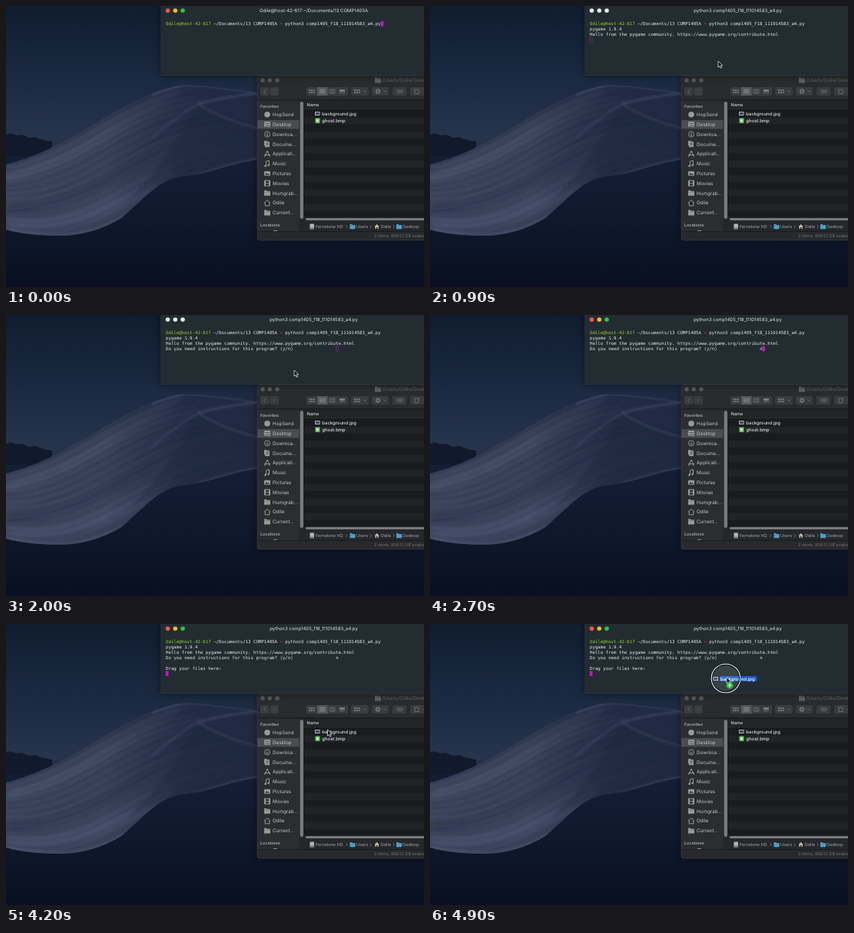
These frames come from a looping animation (544x367 px, 5 s). An HTML page:

```html
<!DOCTYPE html>
<html lang="en">
<head>
<meta charset="utf-8">
<title>Terminal and file window</title>
<style>
html, body { margin: 0; width: 100%; height: 100%; overflow: hidden; background: #0a1122; }
svg { display: block; width: 544px; height: 367px; }
text { font-family: Inter, Roboto, sans-serif; text-rendering: geometricPrecision; white-space: pre; }
.mono text { font: 5.742px "DejaVu Sans Mono", "Liberation Mono", monospace; fill: #e4e8e8; }
</style>
</head>
<body>
<svg id="stage" viewBox="0 0 544 367" xmlns="http://www.w3.org/2000/svg"></svg>
<script>
const LOOP = 5000, STEP = 100;
const USER = 'Odile', HOST = 'host-42-617';
const SCRIPT = 'python3 comp1405_f18_111014583_a4.py';
const FOLDER = '~/Documents/13 COMP1405A';
const COL = 3.457, LINE = 6.95, LEFT = 208, BASE = 25.1;

let seed = 7;
const rnd = () => (seed = seed * 16807 % 2147483647) / 2147483647;

const rect = (x, y, w, h, fill, r = 0, more = '') =>
  `<rect x="${x}" y="${y}" width="${w}" height="${h}" rx="${r}" fill="${fill}" ${more}/>`;
const dot = (x, y, r, fill, more = '') => `<circle cx="${x}" cy="${y}" r="${r}" fill="${fill}" ${more}/>`;
const path = (d, fill, more = '') => `<path d="${d}" fill="${fill}" ${more}/>`;
const line = (d, color, width = .8, more = '') =>
  path(d, 'none', `stroke="${color}" stroke-width="${width}" ${more}`);
const text = (x, y, s, size, fill, more = '') =>
  `<text x="${x}" y="${y}" font-size="${size}" fill="${fill}" ${more}>${s}</text>`;
const mono = (col, row, s, more = '') =>
  `<text x="${LEFT + col * COL}" y="${BASE + row * LINE}" ${more}>${s}</text>`;
const grad = (id, stops, dir = 'x2="0" y2="1"') => `<linearGradient id="${id}" ${dir}>` +
  stops.map(([at, c]) => `<stop offset="${at}" stop-color="${c}"/>`).join('') + '</linearGradient>';
const folder = (x, y, c, size = 8) => `<g transform="translate(${x} ${y}) scale(${size / 8})">` +
  path('M0 0h3l1 1h4v6h-8z', c) + line('M0 2.2h8', '#0005', .5) + '</g>';
const house = (x, y, c, size = 8) => `<g transform="translate(${x} ${y}) scale(${size / 8})">` +
  path('M0 4l4-4 4 4h-1v4h-2v-3h-2v3h-2v-4z', c) + '</g>';

function wallpaper() {
  const top = [0, 207, 90, 185, 150, 118, 235, 103];
  const low = [0, 292, 130, 320, 150, 225, 327, 200];
  let stars = '', streaks = '';
  for (let i = 0; i < 40; i++)
    stars += dot(rnd() * 326, rnd() * 130, .2 + rnd() * .3, '#a9bfdd', `opacity="${.15 + rnd() * .4}"`);
  for (let i = 0; i < 26; i++) {
    const k = (i + rnd()) / 26;
    const p = top.map((v, j) => v + (low[j] - v) * k);
    streaks += line(`M${p[0]} ${p[1]}C${p.slice(2)}`, i % 2 ? '#7a839c' : '#18213a',
      1.5 + rnd() * 3, `opacity="${.05 + rnd() * .13}"`);
  }
  return rect(0, 0, 544, 367, 'url(#sky)') + stars +
    path('M0 168l6-2 8 3 7-1 9 4 8-1 10 4 12 2V212H0z', '#111a2c') +
    rect(0, 196, 544, 171, 'url(#ground)') +
    '<g clip-path="url(#dune)">' + rect(0, 100, 330, 210, 'url(#sand)') +
    '<g filter="url(#soft)">' + streaks + '</g>' +
    `<g filter="url(#wide)">` +
    line('M0 222Q70 202 120 170T225 112', '#667089', 9, 'opacity=".3"') +
    line('M0 262Q80 252 140 216T250 150', '#151e36', 12, 'opacity=".3"') +
    line('M0 285Q70 292 130 264T215 215', '#69738e', 11, 'opacity=".36"') + '</g>' +
    rect(130, 100, 200, 210, 'url(#dusk)') +
    `<g filter="url(#soft)">` +
    path('M250 127L330 158V205L228 224Q180 236 160 252Q215 200 250 127z', '#18223a', 'opacity=".4"') +
    line('M250 128Q285 150 330 160', '#56617c', 2, 'opacity=".45"') +
    line('M250 128Q285 118 330 114', '#5c6782', 2.5, 'opacity=".45"') +
    line('M250 128Q225 142 190 172', '#5b6680', 2, 'opacity=".35"') +
    line('M190 116Q220 103 240 103T330 113', '#69748e', 2, 'opacity=".5"') +
    line('M0 292C60 302 100 304 150 277S220 222 327 200', '#737d95', 2, 'opacity=".35"') +
    '</g></g>';
}

function sidebar() {
  const names = ['HopSend', 'Desktop', 'Downloa...', 'Docume...', 'Applicati...', 'Music',
    'Pictures', 'Movies', 'Humgrab...', USER, 'Current...'];
  const c = '#97999b', x = 336;
  const icon = [
    y => dot(x + 4, y + 4, 3.8, c),
    y => rect(x, y + .5, 8, 7, c, 1) + line(`M${x + 1} ${y + 3}h6m-6 3h6`, '#3c3e40', .7),
    y => dot(x + 4, y + 4, 3.6, 'none', `stroke="${c}" stroke-width=".9"`) +
      line(`M${x + 4} ${y + 2}v4m-2-2l2 2 2-2`, c),
    y => path(`M${x} ${y}h4v1h3v7h-6v-2h-1z`, c) + line(`M${x + 2} ${y + 3}h4m-4 2h4`, '#303234', .6),
    y => line(`M${x + 4} ${y}l-3.5 8M${x + 4} ${y}l3.5 8M${x} ${y + 5.5}h8`, c, 1),
    y => line(`M${x + 2.5} ${y + 7}v-6l4-1v6`, c, 1) + dot(x + 1.6, y + 7, 1.3, c) + dot(x + 5.6, y + 6, 1.3, c),
    y => rect(x, y + 1, 8, 6, c, 1) + path(`M${x + 1} ${y + 6}l2-3 1.5 2 1-1 1.5 2z`, '#393b3d'),
    y => rect(x, y, 8, 8, c, .7) + rect(x + 2, y + 1, 4, 2.6, '#303234') + rect(x + 2, y + 4.4, 4, 2.6, '#303234'),
    y => folder(x, y + .5, c),
    y => line(`M${x} ${y + 4}l4-3.7 4 3.7m-6.8-.6v4.3h5.6v-4.3`, c, 1),
    y => folder(x, y + .5, c)
  ];
  return rect(327, 123, 61, 171, '#2b2d2f') + rect(327, 149, 55, 11.4, '#4a4c4f') +
    text(331, 133, 'Favorites', 5.4, '#a8aaac', 'font-weight="600"') +
    names.map((n, i) => {
      const y = 141.8 + i * 12.82;
      return icon[i](y - 4) + text(347, y + 2.3, n, 6.3, '#c3c5c7');
    }).join('') +
    text(331, 288, 'Locations', 5.4, '#a8aaac', 'font-weight="600"') +
    rect(348, 293, 5, 1, '#8c8e90') +
    rect(381.5, 123, 6.5, 171, '#242628') + rect(382.6, 125, 4.4, 153, '#77797b', 2.2);
}

const photoIcon = (x, y) => rect(x, y, 6.5, 5, '#d4d8dc', .4) + rect(x + .7, y + .7, 5.1, 3.6, '#3b4658');

function toolbar() {
  const g = '#77797b', button = (x, w) => rect(x, 106, w, 11, '#393b3d', 1.8);
  let s = rect(327, 91.5, 230, 31.5, '#292b2d', 3) + rect(327, 122.4, 217, .8, '#131517');
  for (const x of [334, 343.3, 353]) s += dot(x, 97, 2.8, '#55575a');
  s += folder(480, 93.5, '#5c5f62') + text(489.5, 99.2, `/Users/${USER}/Desktop`, 6.4, '#606366');
  s += button(331, 11.5) + button(343.5, 11.5) + button(391, 54) + button(449, 23) +
    button(476, 22) + button(503, 18) + button(526, 20) + rect(405, 106, 13.5, 11, '#57595b');
  s += line('M338 109l-2.5 2.5 2.5 2.5', g) + line('M348 109l2.5 2.5-2.5 2.5', '#56585a');
  for (let i = 0; i < 6; i++)
    s += rect(394.2 + i % 3 * 2.8, 109 + (i > 2) * 3, 2, 2, g) + rect(453 + i % 3 * 2.8, 109 + (i > 2) * 3, 2, 2, g);
  s += line('M408 109.5h7.5m-7.5 2h7.5m-7.5 2h7.5', '#929496', .8) +
    line('M421 109h7v5h-7zm2.4 0v5m2.4-5v5', g, .7) + rect(434, 109, 7, 3, g) +
    line('M434 113.5h7', g, 1.2, 'stroke-dasharray="1.4 .6"') +
    line('M465.5 110.7l1.5 1.5 1.5-1.5M491.5 110.7l1.5 1.5 1.5-1.5', g) +
    dot(484, 111.5, 2, 'none', `stroke="${g}" stroke-width="1.3"`) +
    dot(484, 111.5, 3.2, 'none', `stroke="${g}" stroke-width="1" stroke-dasharray="1.2 1.31"`) +
    rect(508.5, 109.7, 8, 3.6, 'none', 1.8, `stroke="${g}" stroke-width=".8"`) +
    line('M510.5 111.5h4', g) + line('M532 109h5v5.5h-5z', g);
  return s;
}

function fileWindow() {
  let rows = rect(388, 123, 156, 157, '#191b1d') + rect(388, 123, 156, 11, '#222426');
  for (let i = 0; i < 15; i++) if (i % 2) rows += rect(389, 135.8 + i * 9.42, 155, 9.42, '#212326');
  const crumbs = [[403, 'Fernstone HD'], [456, 'Users'], [487.5, USER], [516, 'Desktop']];
  return rect(327, 91.5, 225, 214.5, '#000', 3, 'opacity=".45" filter="url(#shadow)"') +
    rect(327, 91.5, 230, 214.5, '#292b2d', 3) + rows + sidebar() + toolbar() +
    text(391.5, 131, 'Name', 5.6, '#d0d2d4', 'font-weight="500"') + rect(388, 134, 156, .6, '#37393b') +
    photoIcon(402, 138) + text(411.3, 142.5, 'background.jpg', 5.95, '#e0e2e4', 'font-weight="500"') +
    rect(402.5, 146.5, 6, 6.5, '#65c466', .7) + dot(405.5, 149.6, 1.6, '#d8f2d8') +
    text(411.3, 152, 'ghost.bmp', 5.95, '#e0e2e4', 'font-weight="500"') +
    rect(388, 276, 156, 5, '#242628') + rect(390, 277, 160, 3.1, '#77797b', 1.5) +
    rect(388, 281, 156, 13.5, '#25272a') +
    rect(395.5, 284.5, 5.5, 7, '#b3b5b7', .7) + rect(395.5, 289.5, 5.5, 2, '#77797b') +
    folder(447.5, 285, '#4ba3cf', 7) + house(479.7, 285, '#c9bba6', 6) + folder(508, 285, '#4ba3cf', 7) +
    crumbs.map(([x, s]) => text(x, 290.2, s, 5.5, '#a6a8aa')).join('') +
    [442.5, 474, 504].map(x => line(`M${x} 286.4l1.5 1.8-1.5 1.8`, '#909294', .7)).join('') +
    rect(327, 294.3, 217, .7, '#151719') + rect(327, 295, 217, 11, '#28292c') +
    text(479, 302.2, '2 items, 869.12 GB available', 5.5, '#6d7073') +
    rect(327, 91.5, 230, 214.5, 'none', 3, 'stroke="#3e4044" stroke-width=".6"');
}

function terminal() {
  const prompt = `<tspan fill="#9bcf35">${USER}@${HOST}</tspan> ${FOLDER} <tspan fill="#d83a45">»</tspan> ${SCRIPT}`;
  return rect(201, -6, 360, 97, '#000', 3, 'opacity=".45" filter="url(#shadow)"') +
    rect(201, -6, 360, 97, '#222c31', 3) + rect(201, 90.4, 343, .6, '#30393e') +
    [210.5, 220.3, 230].map(x => dot(x, 6, 2.8, '#fff', 'class="light"')).join('') +
    text(400.5, 8.2, '', 6, '#e1e5e6', 'id="title" text-anchor="middle"') +
    '<g class="mono">' + mono(0, 0, prompt) +
    '<g id="hello">' + mono(0, 1, 'pygame 1.9.4') +
    mono(0, 2, 'Hello from the pygame community. https://www.pygame.org/contribute.html') + '</g>' +
    mono(0, 3, 'Do you need instructions for this program? (y/n)', 'id="ask"') +
    mono(64, 3, 'n', 'id="answer"') + mono(0, 5, 'Drag your files here:', 'id="drop"') + '</g>' +
    rect(0, 0, 3.1, 6.1, '#c416c4', 0, 'id="caret" stroke="#c416c4" stroke-width=".5"');
}

const pointer = '<g id="drag">' + photoIcon(-17.5, -.5) + rect(-9, -1.5, 48.5, 7, '#175bc7', 2) +
  text(-8, 4.2, 'background.jpg', 5.95, '#fff', 'font-weight="500"') +
  dot(-1, 1.5, 18.6, '#fff', 'fill-opacity=".1" stroke="#111719" stroke-width="3"') +
  dot(-1, 1.5, 18.8, 'none', 'stroke="#f1f3f3" stroke-width="1.1"') + '</g>' +
  path('M0 0v8l1.9-1.7 1.3 2.8 1.4-.6-1.3-2.8h2.5z', '#080808', 'stroke="#fff" stroke-width=".7"') +
  '<g id="plus">' + dot(4, 10.5, 4.5, '#29b83c') + line('M1.4 10.5h5.2M4 7.9v5.2', '#fff', 1.2) + '</g>';

document.getElementById('stage').innerHTML = '<defs>' +
  grad('sky', [[0, '#101d30'], [.25, '#1a2940'], [.48, '#27354c'], [.6, '#151f35'], [1, '#090f20']]) +
  grad('ground', [[0, '#141e35'], [.5, '#0f182c'], [1, '#090f20']]) +
  grad('sand', [[0, '#2e384f'], [.4, '#363f56'], [.75, '#3b445b'], [1, '#343d55']]) +
  grad('dusk', [[0, '#17213a00'], [.55, '#17213a90'], [1, '#17213ab0']], 'x2="1" y2="0"') +
  '<filter id="soft"><feGaussianBlur stdDeviation="1.6"/></filter>' +
  '<filter id="wide"><feGaussianBlur stdDeviation="5"/></filter>' +
  '<filter id="shadow" x="-20%" y="-30%" width="140%" height="160%"><feGaussianBlur stdDeviation="5"/></filter>' +
  '<clipPath id="dune"><path d="M0 207C90 185 150 118 225 104Q245 101 330 114V200' +
  'C290 206 265 219 232 222S180 252 150 277Q112 300 70 300T0 292z"/></clipPath></defs>' +
  wallpaper() + fileWindow() + terminal() + `<g id="pointer">${pointer}</g>`;

const el = id => document.getElementById(id);
const show = (id, on) => el(id).setAttribute('display', on ? 'inline' : 'none');
const lights = [...document.querySelectorAll('.light')];

const ease = k => k * k * (3 - 2 * k);
function glide(t, start, end, from, to) {
  const k = ease(Math.min(1, Math.max(0, (t - start) / (end - start))));
  return from.map((v, i) => v + (to[i] - v) * k);
}

function caretCell(t) {
  if (t < 100) return [81, 0];
  if (t < 600) return [0, 1];
  if (t < 1300) return [0, 3];
  if (t < 2700) return [64, 3];
  return t < 3300 ? [65, 3] : [0, 6];
}

function draw(now) {
  const t = Math.floor(now % LOOP / STEP) * STEP;
  const focused = t < 700 || t >= 2100;
  const rest = [375, 72], file = [418.5, 138], end = [386, 69.5];

  el('title').textContent = t < 100 ? `${USER}@${HOST}:${FOLDER}` : SCRIPT;
  ['#fc5650', '#fdbc2e', '#2ac940'].forEach((c, i) => lights[i].setAttribute('fill', focused ? c : '#e8eaea'));
  show('hello', t >= 600);
  show('ask', t >= 1300);
  show('answer', t >= 2700);
  show('drop', t >= 3300);

  const [col, row] = caretCell(t), caret = el('caret');
  caret.setAttribute('x', LEFT + col * COL);
  caret.setAttribute('y', BASE - 5 + row * LINE);
  caret.setAttribute('fill-opacity', focused ? 1 : 0);

  const [x, y] = t < 4400 ? glide(t, 3600, 4100, rest, file) : glide(t, 4400, 4900, file, end);
  el('pointer').setAttribute('transform', `translate(${x} ${y})`);
  show('pointer', t >= 700 && t < 2700 || t >= 3600);
  show('drag', t >= 4500);
  show('plus', t >= 4500 && y < 90);
}

function tick() {
  draw(performance.now());
  requestAnimationFrame(tick);
}
tick();
</script>
</body>
</html>
```
